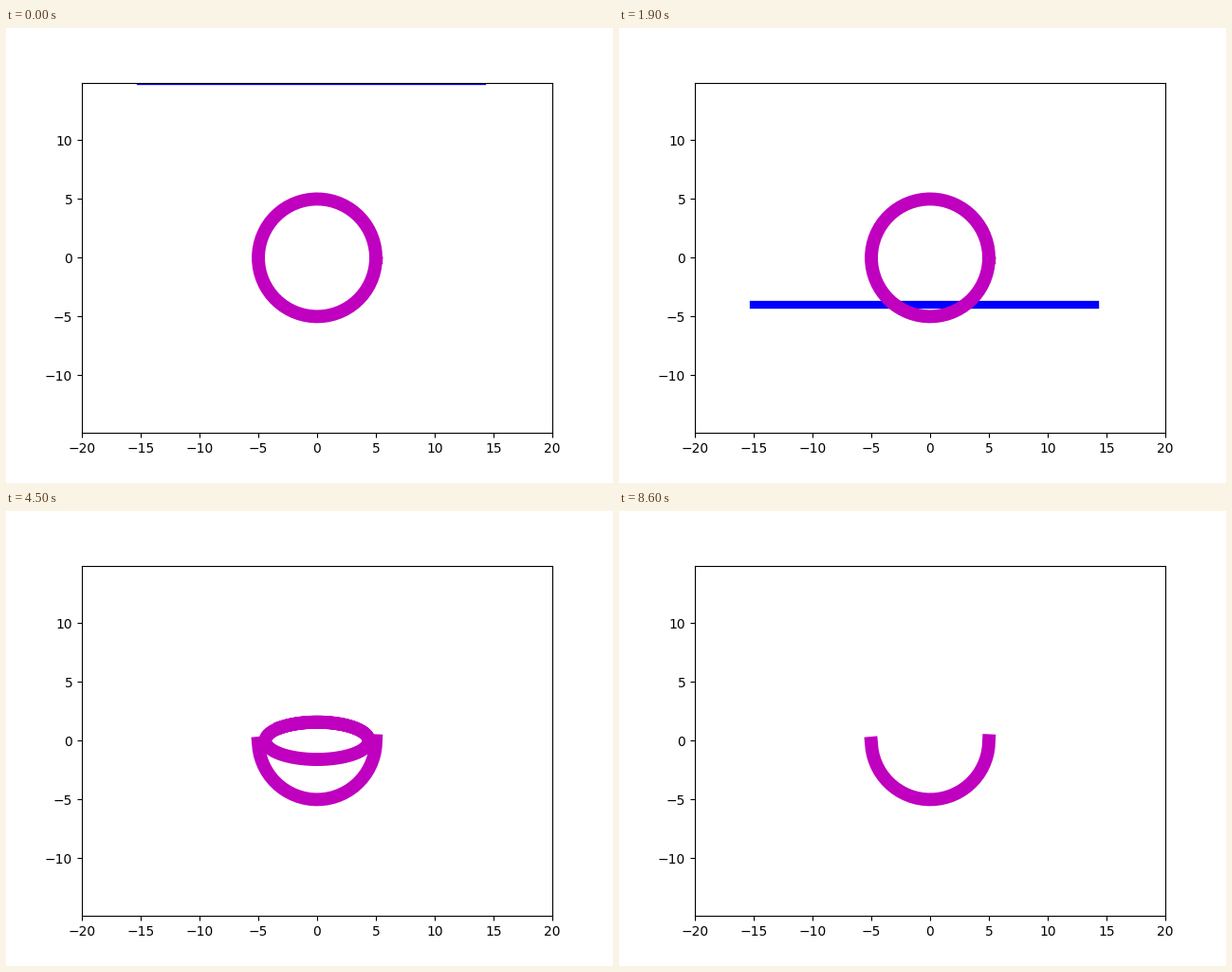
Animation, 640 px wide and 480 px high, one loop 10000 ms. Source, as a matplotlib script:

```python
import numpy as np
import matplotlib.pyplot as plt
from matplotlib.animation import FuncAnimation

FRAMES, INTERVAL = 100, 100
CUT, LID_GONE = 44, 86          # frames where the ring opens and the lid leaves
RADIUS, LID_WIDTH = 5, 4.4

fig, ax = plt.subplots(figsize=(6.4, 4.8), dpi=100)
half_height = 20 * (4.8 * 0.77) / (6.4 * 0.775)   # equal scale on both axes
ax.set_xlim(-20, 20)
ax.set_ylim(-half_height, half_height)

bar, = ax.plot([], [], color="b", lw=6)
ring, = ax.plot([], [], color="m", lw=10)
lid, = ax.plot([], [], color="m", lw=10)

full_turn = np.arange(0, 2 * np.pi, 0.1)
lower_half = np.arange(0, -np.pi, -0.1)
lid_turn = np.arange(0, 8.7, 0.1)


def ellipse(t, a, b):
    return a * np.cos(t), b * np.sin(t)


def lid_height(i):
    return 0.83 * (1 + np.cos(0.264 * (i - 70.4)))


def update(i):
    bar.set_data([-15, 14], [15 - i, 15 - i])
    turn = full_turn if i < CUT else lower_half
    ring.set_data(*ellipse(turn, RADIUS, RADIUS))
    if CUT <= i < LID_GONE:
        lid.set_data(*ellipse(lid_turn, LID_WIDTH, lid_height(i)))
    else:
        lid.set_data([], [])
    return bar, ring, lid


anim = FuncAnimation(fig, update, frames=FRAMES, interval=INTERVAL,
                     repeat=True, repeat_delay=0)
plt.show()
```
